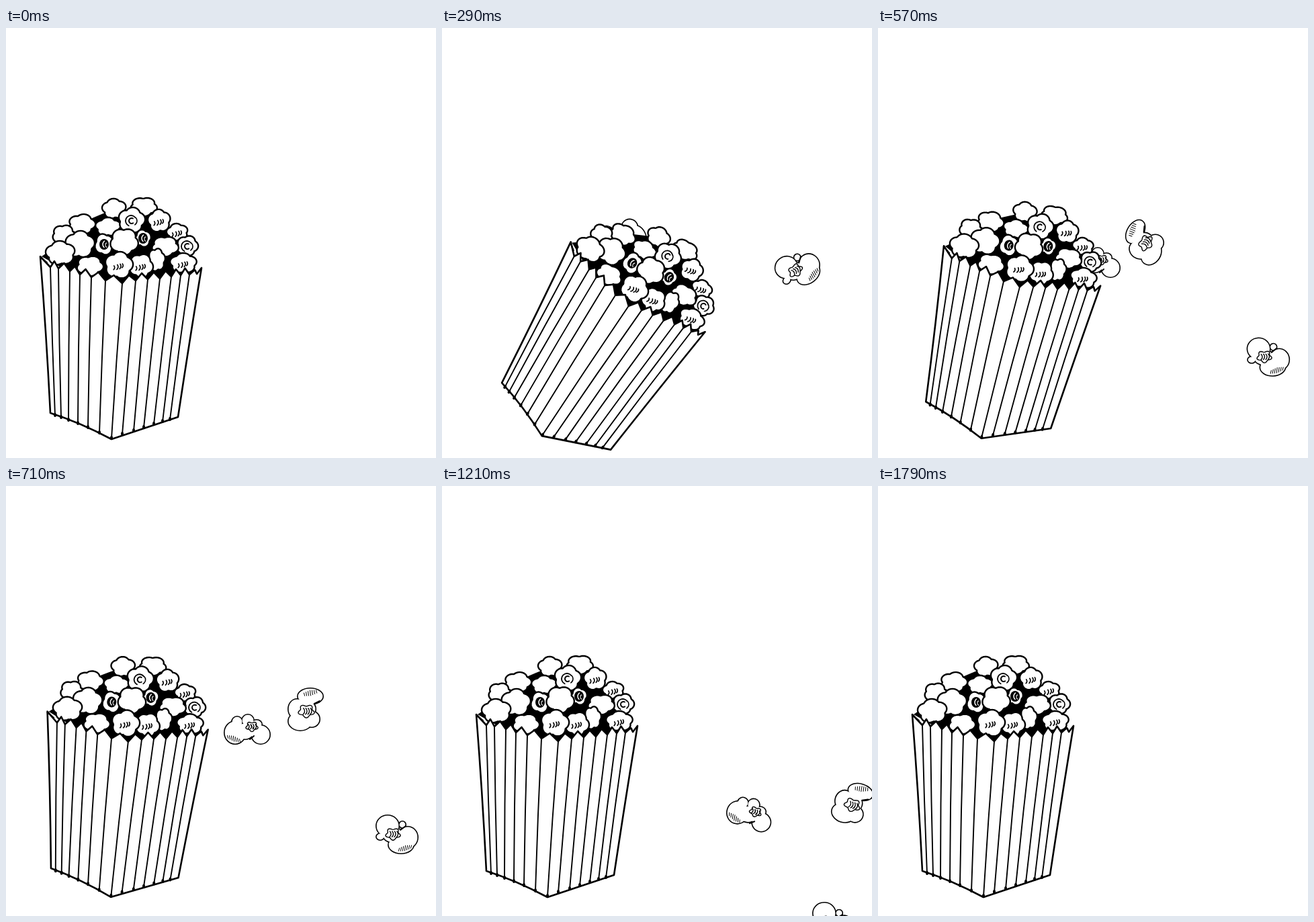
Animation of 640x640 px, one loop 3.21 s. Source, as an HTML page with a canvas:

```html
<!DOCTYPE html>
<html lang="en">
<head>
<meta charset="utf-8">
<title>Popcorn</title>
<style>
html, body { margin: 0; width: 100%; height: 100%; overflow: hidden; background: #fff; }
canvas { display: block; width: 640px; height: 640px; }
</style>
</head>
<body>
<canvas id="stage" width="640" height="640"></canvas>
<script>
const ctx = document.getElementById('stage').getContext('2d');
const LOOP = 3210, FPS = 14, LAST_STEP = 25;
const TAU = Math.PI * 2, RAD = Math.PI / 180;
const PIVOT = { x: 162, y: 594 };

// Pile, back to front: x, y, half width, half height, lobes, turn, detail
const BACK = [
  [205, 266, 20, 14, 5, 0.9, ''],
  [161, 269, 18, 15, 5, 0.2, ''],
  [113, 292, 20, 15, 5, 0.6, ''],
  [152, 296, 19, 14, 5, 0.3, ''],
  [228, 287, 17, 17, 5, 0.2, 'hatch'],
  [187, 286, 20, 19, 5, 0.5, 'swirl'],
  [86, 308, 17, 15, 5, 0.8, ''],
  [204, 313, 12, 13, 4, 0.4, 'kernel'],
  [255, 304, 16, 13, 5, 0.1, 'hatch'],
  [270, 324, 16, 15, 5, 0.7, 'swirl']
];
const FRONT = [
  [146, 322, 14, 16, 4, 0.3, 'kernel'],
  [237, 325, 20, 15, 5, 0.9, ''],
  [110, 322, 22, 20, 5, 0.4, ''],
  [176, 318, 21, 20, 5, 0.9, ''],
  [81, 335, 22, 18, 5, 0.2, ''],
  [125, 354, 20, 15, 5, 0.8, ''],
  [224, 345, 13, 17, 6, 0.3, ''],
  [201, 354, 18, 18, 5, 0.8, 'hatch'],
  [168, 353, 21, 20, 5, 0.5, 'hatch'],
  [264, 350, 20, 15, 5, 0.3, 'hatch']
];

// Stripe seams: top x, top y, bottom x, bottom y
const SEAMS = [
  [66, 356, 73, 577], [78, 358, 82, 580], [95, 362, 93, 584], [110, 367, 107, 589],
  [127, 371, 122, 595], [148, 376, 139, 603], [173, 380, 157, 611], [193, 376, 173, 605],
  [211, 374, 190, 600], [229, 373, 205, 595], [246, 370, 220, 590], [260, 368, 233, 586],
  [273, 367, 244, 583]
];

// lobes: x, y, rx, ry; path: step, x, y, degrees
const FLYERS = [
  {
    lobes: [[-13, -12, 18, 17], [-24, 4, 7, 6], [9, -14, 6, 6], [17, 5, 16, 17], [7, 16, 20, 14], [-4, 2, 17, 12]],
    kernel: [-5, 0, 11], hatch: [13, 21, -5, 0], crease: [6, -6, 14, -12],
    path: [[0, 200, 325, -90], [2, 380, 310, -65], [4, 530, 358, -37], [6, 574, 438, -13],
           [8, 580, 489, -2], [10, 581, 518, 0], [14, 581, 587, 3], [18, 581, 670, 5]]
  },
  {
    lobes: [[-12, 0, 14, 16], [8, -19, 20, 13], [-7, 18, 19, 15], [10, 15, 13, 13], [2, 0, 15, 14]],
    kernel: [2, 3, 12], hatch: [8, -24, 5, -20], crease: [14, -8, 22, -12],
    path: [[0, 150, 330, -160], [4, 270, 312, -115], [8, 395, 320, -58], [10, 445, 332, 0],
           [14, 557, 391, 11], [21, 668, 592, 25], [25, 720, 720, 32]]
  },
  {
    lobes: [[-17, 5, 17, 18], [-14, -11, 9, 9], [2, -13, 10, 10], [15, -7, 9, 8], [21, 8, 15, 15], [-2, 3, 14, 13]],
    kernel: [8, -4, 9], hatch: [-19, 14, 5, 12], crease: [5, 15, 11, 10],
    path: [[0, 180, 400, -20], [4, 250, 365, -10], [8, 325, 349, 0], [10, 358, 362, 0],
           [14, 425, 420, 12], [21, 490, 581, 25], [25, 493, 668, 30]]
  }
];

// Smooth curve through unevenly spaced rows, as [x, y, degrees]
function follow(path, step) {
  const end = path.length - 1;
  const at = Math.min(Math.max(step, path[0][0]), path[end][0]);
  let i = 0;
  while (i < end - 1 && path[i + 1][0] <= at) i++;
  const a = path[i], b = path[i + 1], span = b[0] - a[0], u = (at - a[0]) / span;
  const slope = (j, c) => {
    const p = path[Math.max(j - 1, 0)], q = path[Math.min(j + 1, end)];
    return (q[c] - p[c]) / (q[0] - p[0]) * span;
  };
  return [1, 2, 3].map(c =>
    (1 + 2 * u) * (1 - u) ** 2 * a[c] + u * (1 - u) ** 2 * slope(i, c) +
    u * u * (3 - 2 * u) * b[c] + u * u * (u - 1) * slope(i + 1, c));
}

function tilt(step) {
  const peak = 34, top = 1.7, rest = 11.7;
  if (step >= rest) return 0;
  const phase = step < top ? 1 - step / top : (step - top) / (rest - top);
  return peak * (1 + Math.cos(Math.PI * phase)) / 2;
}

function line(width, ...points) {
  ctx.lineWidth = width;
  ctx.beginPath();
  points.forEach(([x, y]) => ctx.lineTo(x, y));
  ctx.stroke();
}

function oval(x, y, rx, ry, color) {
  ctx.fillStyle = color;
  ctx.beginPath();
  ctx.ellipse(x, y, Math.max(rx, 0), Math.max(ry, 0), 0, 0, TAU);
  ctx.fill();
}

function arc(x, y, r, from, to, width) {
  ctx.lineWidth = width;
  ctx.beginPath();
  ctx.arc(x, y, r, from, to);
  ctx.stroke();
}

function detail(x, y, kind) {
  if (kind === 'hatch') {
    for (let i = -1.5; i <= 1.5; i++) {
      arc(x - 4 + i * 4.2, y + 2 - i, 5.5 - Math.abs(i), -0.7, 0.9, 1.7);
    }
  } else if (kind === 'swirl') {
    arc(x - 1, y + 1, 8, 2, 5.6, 1.8);
    arc(x, y + 1, 4, 1, 5.2, 2);
    arc(x + 1, y + 1, 7, -0.8, 1, 1.6);
  } else if (kind === 'kernel') {
    oval(x, y, 7, 8, '#000');
    ctx.strokeStyle = '#fff';
    arc(x + 4, y, 6, 2.3, 4.1, 1.5);
    arc(x + 6, y + 1, 4, 2.2, 4, 1.2);
    ctx.strokeStyle = '#000';
  }
}

function puff([x, y, rx, ry, lobes, turn, kind]) {
  ctx.beginPath();
  for (let i = 0; i < 72; i++) {
    const a = i / 72 * TAU;
    const r = 0.84 + 0.17 * Math.abs(Math.sin(lobes * (a - turn) / 2)) ** 0.8;
    ctx.lineTo(x + rx * r * Math.cos(a), y + ry * r * Math.sin(a));
  }
  ctx.closePath();
  ctx.fillStyle = '#fff';
  ctx.fill();
  ctx.lineWidth = 2.4;
  ctx.stroke();
  detail(x, y, kind);
}

function drawBox() {
  ctx.fillStyle = '#000';
  ctx.beginPath();
  [[53, 340], [75, 325], [100, 295], [140, 278], [160, 270], [205, 270], [232, 290],
   [268, 322], [272, 350], [284, 362], [230, 380], [173, 386], [110, 372]]
    .forEach(([x, y]) => ctx.lineTo(x, y));
  ctx.fill();
  BACK.forEach(puff);
  FRONT.forEach(puff);

  ctx.beginPath();
  ctx.moveTo(51, 340);
  SEAMS.forEach(([x, y], i) => {
    ctx.lineTo(x, y);
    const next = SEAMS[i + 1];
    if (next) ctx.lineTo((x + next[0]) / 2, (y + next[1]) / 2 - 10);
  });
  ctx.lineTo(281, 360);
  ctx.lineTo(284, 366);
  ctx.lineTo(291, 357);
  ctx.quadraticCurveTo(274, 460, 256, 579);
  ctx.lineTo(157, 612);
  ctx.quadraticCurveTo(110, 587, 66, 573);
  ctx.quadraticCurveTo(60, 455, 51, 340);
  ctx.closePath();
  ctx.fillStyle = '#fff';
  ctx.fill();
  ctx.lineWidth = 2.6;
  ctx.stroke();

  SEAMS.forEach(([x1, y1, x2, y2]) => {
    ctx.lineWidth = 1.9;
    ctx.beginPath();
    ctx.moveTo(x1, y1);
    ctx.quadraticCurveTo((x1 + x2) / 2 - 1, (y1 + y2) / 2, x2, y2);
    ctx.stroke();
    oval(x2, y2 - 1, 2, 3, '#000');
  });
  line(2, [51, 341], [61, 349]);
}

function drawFlyer({ lobes, kernel, hatch, crease, path }, step) {
  const [x, y, degrees] = follow(path, step);
  ctx.save();
  ctx.translate(x, y);
  ctx.rotate(degrees * RAD);
  lobes.forEach(([lx, ly, rx, ry]) => oval(lx, ly, rx, ry, '#000'));
  lobes.forEach(([lx, ly, rx, ry]) => oval(lx, ly, rx - 1.6, ry - 1.6, '#fff'));

  const [kx, ky, size] = kernel;
  ctx.lineWidth = 1.4;
  ctx.beginPath();
  for (let i = 0; i < 40; i++) {
    const a = i / 40 * TAU, r = size * (0.9 + 0.15 * Math.sin(5 * a));
    ctx.lineTo(kx + r * Math.cos(a), ky + r * 0.8 * Math.sin(a));
  }
  ctx.closePath();
  ctx.stroke();
  for (let i = -1; i <= 2; i++) arc(kx - 5 + i * 3.5, ky, size * 0.5, -0.8, 0.9, 1.4);

  const [hx, hy, dx, dy] = hatch;
  for (let i = -3; i <= 3; i++) {
    const px = hx + i * 3, py = hy + i * (dy > 0 ? 0.9 : -0.7), half = 4 - Math.abs(i) * 0.6;
    line(1, [px - dx * 0.12, py - half], [px + dx * 0.12, py + half]);
  }
  line(2, crease.slice(0, 2), crease.slice(2));
  ctx.restore();
}

function draw(time) {
  const t = Math.floor(time % LOOP / 10) * 10;
  const step = Math.floor((t + 5) * FPS / 1000);
  ctx.fillStyle = '#fff';
  ctx.fillRect(0, 0, 640, 640);
  ctx.strokeStyle = '#000';
  ctx.lineJoin = ctx.lineCap = 'round';

  if (step > 0 && step < LAST_STEP) FLYERS.forEach(flyer => drawFlyer(flyer, step));

  ctx.save();
  ctx.translate(PIVOT.x, PIVOT.y);
  ctx.rotate(tilt(step) * RAD);
  ctx.translate(-PIVOT.x, -PIVOT.y);
  drawBox();
  ctx.restore();
}

const start = performance.now();
function tick() {
  draw(performance.now() - start);
  requestAnimationFrame(tick);
}
tick();
</script>
</body>
</html>
```
